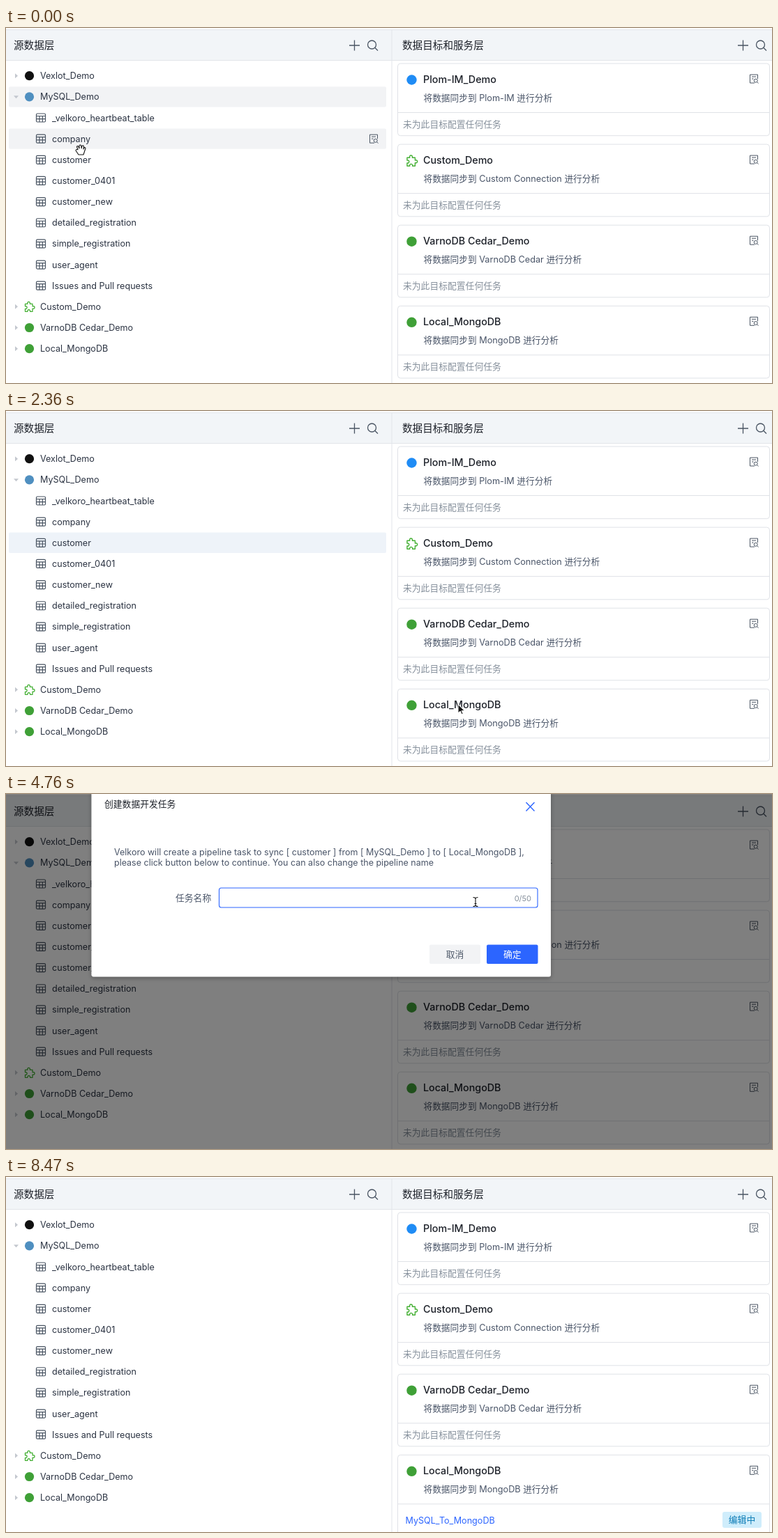
Recreate the animation shown at these times as an HTML page. Size 1098 by 510 pixels, loop 8910 ms.

```html
<!DOCTYPE html>
<html lang="zh-CN">
<head>
<meta charset="utf-8">
<title>Data pipeline</title>
<style>
html, body { margin: 0; width: 100%; height: 100%; overflow: hidden; background: #fff; }
svg { display: block; width: 1098px; height: 510px; }
text { font-family: Inter, "Noto Sans CJK SC", "Noto Sans CJK", sans-serif; white-space: pre; }
</style>
</head>
<body>
<svg id="stage" viewBox="0 0 1098 510" fill="none"></svg>
<script>
const LOOP = 8910, BEAT = 148.5;
const INK = '#2b3342', GREY = '#86909c', LINE = '#4a5563', BLUE = '#2c65ff', GREEN = '#3fa037';
const TASK = 'MySQL_To_MongoDB';

// Pointer keys: beat, x, y
const PATH = [[0, 107, 175], [3, 105, 193], [4, 105, 193], [7, 245, 226], [10, 548, 300], [11, 605, 365],
  [12, 642, 416], [13, 648, 421], [18, 648, 421], [23, 700, 262], [28, 673, 155], [36, 673, 155],
  [41, 734, 228], [54, 734, 228], [56, 998, 445]];

function pointerAt(k) {
  const i = PATH.findIndex(p => p[0] > k);
  if (i < 0) return PATH[PATH.length - 1].slice(1);
  const [a, x, y] = PATH[i - 1], [b, X, Y] = PATH[i], u = (k - a) / (b - a);
  return [x + (X - x) * u, y + (Y - y) * u];
}

const clamp = u => Math.max(0, Math.min(1, u));
const easeOut = u => 1 - (1 - clamp(u)) ** 2.3;

const text = (x, cy, s, size = 12.6, fill = INK, attrs = '') =>
  `<text x="${x}" y="${cy + size * .365}" font-size="${size}" fill="${fill}" ${attrs}>${s}</text>`;
const rect = (x, y, w, h, fill, attrs = '') =>
  `<rect x="${x}" y="${y}" width="${w}" height="${h}" fill="${fill}" ${attrs}/>`;
const path = (d, stroke, width = 1, attrs = '') =>
  `<path d="${d}" stroke="${stroke}" stroke-width="${width}" ${attrs}/>`;
const dot = (x, y, r, fill) => `<circle cx="${x}" cy="${y}" r="${r}" fill="${fill}"/>`;
const at = (x, y, s, attrs = '', scale = 1) =>
  `<g transform="translate(${x} ${y}) scale(${scale})" ${attrs}>${s}</g>`;

const table = (x, y) => at(x, y,
  path('M-5-6H5Q6.5-6 6.5-4.5V4.5Q6.5 6 5 6H-5Q-6.5 6-6.5 4.5V-4.5Q-6.5-6-5-6ZM-6.5-2.5H6.5M-6.5 1.7H6.5M-2-2.5V6M2.3-2.5V6', LINE, 1.2));
const docSearch = (x, y) => at(x, y,
  path('M1 6H-5.5V-6H5.5V0M-3-3H3M-3 0H-.5M4.5 4.5L6.5 6.5', LINE) +
  `<circle cx="2.7" cy="2.7" r="2.5" stroke="${LINE}"/>`);
const puzzle = (x, y, scale) => at(x, y, path(
  'M-6-4H-2.5C-4-8 2-8 .8-4H4.5V-.5C8.5-2 8.5 4 4.5 2.8V7H1C2 3.5-3.5 3.5-2.5 7H-6V3C-2.5 4-2.5-1.5-6-.5Z',
  '#45b035', 1.3, 'stroke-linejoin="round"'), '', scale);
const logo = (x, y, kind, r) => kind === 'puzzle' ? puzzle(x, y, r / 6.6) : dot(x, y, r, kind);

const SOURCES = [
  ['Vexlot_Demo', '#111'], ['MySQL_Demo', '#4f8fc0'], '_velkoro_heartbeat_table', 'company', 'customer',
  'customer_0401', 'customer_new', 'detailed_registration', 'simple_registration', 'user_agent',
  'Issues and Pull requests', ['Custom_Demo', 'puzzle'], ['VarnoDB Cedar_Demo', GREEN], ['Local_MongoDB', GREEN]];
const TARGETS = [
  ['Plom-IM_Demo', 'Plom-IM', '#1f8cf5'], ['Custom_Demo', 'Custom Connection', 'puzzle'],
  ['VarnoDB Cedar_Demo', 'VarnoDB Cedar', GREEN], ['Local_MongoDB', 'MongoDB', GREEN]];

function header(x, title, plusX) {
  return text(x, 25, title, 14.6, '#1d2129', 'font-weight="500"') +
    path(`M${plusX - 7.5} 25H${plusX + 7.5}M${plusX} 17.5V32.5M${plusX + 29.5} 28.5L${plusX + 33.5} 32.5`, LINE, 1.3) +
    `<circle cx="${plusX + 25}" cy="24" r="6" stroke="${LINE}" stroke-width="1.3"/>`;
}

function sourceList(k) {
  const hover = k < 2 ? 3 : k < 20 ? 4 : -1;
  return SOURCES.map((item, i) => {
    const y = 68.7 + i * 30.15;
    let s = '';
    if (i === hover || (i === 1 && k < 5))
      s += rect(4, y - 14.7, 541, 29.3, k > 13 ? '#eef3f9' : '#f2f3f5', 'rx="2"');
    if (i === hover && k < 5) s += docSearch(527, y);
    if (typeof item === 'string') return s + table(50, y) + text(66, y, item);
    const arrow = i === 1 ? 'M-3.5-1.5H3.5L0 2.5Z' : 'M-1.5-3.5V3.5L2.5 0Z';
    return s + at(14.5, y, `<path d="${arrow}" fill="#c3c7ce"/>`) +
      logo(33.5, y, item[1], 6.6) + text(49, y, item[0]);
  }).join('');
}

function targetCards(k) {
  const hot = k === 11 || k === 12 ? 2 : k === 13 ? 3 : -1;
  return TARGETS.map(([name, product, mark], i) => {
    const y = 51 + i * 116.1, lit = i === hot, tasked = i === 3 && k > 44;
    const edge = lit ? '#cedcfd' : '#dfe2e7';
    return rect(561.5, y, 533, tasked ? 140 : 103.7, lit ? '#cedcfd' : '#fff', `stroke="${edge}" rx="4"`) +
      path(`M562 ${y + 70.5}H1094`, edge) +
      logo(581.5, y + 23.5, mark, 7.2) +
      text(598, y + 22.3, name, 14.3, '#1d2129', 'font-weight="500"') +
      text(598.5, y + 49.5, `将数据同步到 ${product} 进行分析`, 12.7, '#4a5568') +
      docSearch(1072, y + 22) +
      (tasked
        ? text(572.5, 493.5, TASK, 12.6, BLUE) + rect(1027, 481, 56, 23, '#cfedfb', 'rx="3"') +
          text(1055, 492.5, '编辑中', 12.8, '#0b7bb5', 'text-anchor="middle" font-weight="500"')
        : text(569, y + 87, '未为此目标配置任何任务', 12.8, GREY));
  }).join('');
}

function dialog(k, show, onInput, onOk) {
  const filled = k >= 35;
  const border = k >= 30 && k < 43 ? BLUE : k >= 43 || onInput ? '#8fabff' : '#e4e7ed';
  const caret = k === 30 || k === 31 ? 320.5 : k === 35 || k === 36 ? 449 : 0;
  const mid = 'text-anchor="middle"';
  return at(0, -18.3 * (1 - show),
    rect(122.5, -40, 658.5, 302.5, '#fff', 'rx="3" filter="url(#deep)"') +
    text(141, 14.5, '创建数据开发任务', 12.8, '#1d2129') +
    path('M745.5 12L757.5 24.5M757.5 12L745.5 24.5', BLUE, 1.4) +
    (k < 20 ? rect(141, 61, 621, 58, '#f5f6f8', 'rx="6"') : '') +
    text(155, 83, 'Velkoro will create a pipeline task to sync [ customer ] from [ MySQL_Demo ] to [ Local_MongoDB ],', 12.5, '#4a5568') +
    text(155, 98, 'please click button below to continue. You can also change the pipeline name', 12.5, '#4a5568') +
    text(243, 149, '任务名称', 12.8, '#4a5568') +
    rect(305.5, 135, 456.5, 28, '#fff', `stroke="${border}" stroke-width="1.1" rx="3"`) +
    (filled ? text(320, 149, TASK, 12.6, '#1d2129') : '') +
    (caret ? path(`M${caret} 142V157`, '#111') : '') +
    text(753, 149.5, (filled ? TASK.length : 0) + '/50', 11, GREY, 'text-anchor="end"') +
    rect(607, 216.5, 73, 27.5, '#f2f3f5', 'rx="2"') + text(643.5, 230, '取消', 12.8, '#4e5969', mid) +
    rect(689, 216.5, 73.5, 27.5, onOk ? '#4a77fb' : BLUE, 'rx="2"') + text(725.7, 230, '确定', 12.8, '#fff', mid),
    `opacity="${show}"`);
}

const chip = (x, y) => at(x - 15, y - 23,
  rect(0, 0, 220, 33.5, '#fff', 'rx="3" filter="url(#soft)"') +
  table(19.5, 16.5) + text(35, 16.5, 'customer', 14.2, '#1d2129'), 'opacity=".94"');

const SHAPES = {
  arrow: ['M0 0V13.5L3.2 10.5 5.2 15 7.3 14 5.3 9.7H9.5Z', '#111', '#fff'],
  finger: ['M-1.5 1Q0-.8 1.3 1V6Q3.5 5 4.2 6.5 6.2 5.8 6.7 7.3 8.5 7 8.3 9L7.5 12.5 6.5 15.5H0L-4.5 9.5Q-4.5 7.5-1.5 9.2Z', '#fff', '#111'],
  grab: ['M-3 7L-7 1Q-6.5-1.3-4-.2L-5.5-4.5Q-4.5-6.5-3-4.5L-2-2-2-6Q-.5-8 .8-6L1.2-2 2-5.5Q3.5-7.2 4.5-5L4-1 5.5-3.5Q7.3-3.5 6.8-1.5L5 4 4 7Z', '#fff', '#111'],
  beam: ['M-3.5-6.5Q0-6.5 0-4.5Q0-6.5 3.5-6.5M0-5V5M-3.5 6.5Q0 6.5 0 4.5Q0 6.5 3.5 6.5M-1.5 2.5H1.5', 'none', '#111']
};

function pointer(k, x, y, kind) {
  const [d, fill, stroke] = SHAPES[kind];
  const plus = at(9, 20, dot(0, 0, 8.3, '#fff') + dot(0, 0, 7.8, '#15a01c') + path('M-4.5 0H4.5M0-4.5V4.5', '#fff', 2));
  return at(x, y, `<path d="${d}" fill="${fill}" stroke="${stroke}" stroke-width="1.1" stroke-linejoin="round"/>` +
    (k > 4 && k < 14 ? plus : ''));
}

const DEFS = `<defs>
  <filter id="soft" x="-20%" y="-80%" width="140%" height="260%"><feDropShadow dx="0" dy="2" stdDeviation="4" flood-opacity=".2"/></filter>
  <filter id="deep"><feDropShadow dx="0" dy="2" stdDeviation="3" flood-opacity=".3"/></filter>
</defs>`;

function scene(k) {
  const [x, y] = pointerAt(k);
  const show = k < 30 ? easeOut((k - 16.8) / 1.8) : easeOut((45.2 - k) / 1.6);
  const open = show > 0;
  const onInput = open && x > 305 && x < 762 && y > 135 && y < 163;
  const onOk = open && x > 689 && x < 762 && y > 216 && y < 244;
  const kind = k < 5 ? 'grab' : onInput ? 'beam' : onOk ? 'finger' : 'arrow';
  return DEFS +
    rect(0, 0, 1098, 510, '#fff') + rect(0, 3, 1098, 43, '#f2f5f8') +
    path('M0 2.5H1098M0 46.5H1098M553 3V510', '#e2e5ea') +
    header(11, '源数据层', 499.5) + header(568, '数据目标和服务层', 1056.5) +
    sourceList(k) + targetCards(k) +
    (k > 4 && k < 14 ? chip(x, y) : '') +
    (open ? rect(0, 0, 1098, 510, '#000', `opacity="${.5 * show ** .67}"`) + dialog(k, show, onInput, onOk) : '') +
    (k < 57 ? pointer(k, x, y, kind) : '');
}

const stage = document.getElementById('stage');
const start = performance.now();
let shown = -1;

// The screen refreshes in even beats
function tick() {
  const t = (performance.now() - start) % LOOP;
  const k = Math.min(59, Math.floor((t + 29) / BEAT));
  if (k !== shown) stage.innerHTML = scene(shown = k);
  requestAnimationFrame(tick);
}
tick();
</script>
</body>
</html>
```
